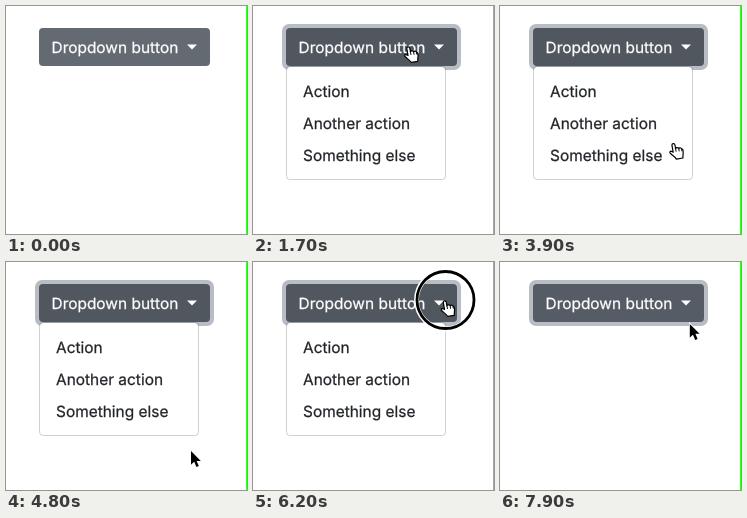
These frames come from a looping animation (241 by 228 pixels, 8 s). An HTML page:

```html
<!DOCTYPE html>
<html lang="en">
<head>
<meta charset="utf-8">
<title>Dropdown</title>
<style>
  html, body { margin: 0; width: 100%; height: 100%; overflow: hidden; background: #fff; }
  svg { display: block; width: 241px; height: 228px; }
  text {
    font: 15.45px Inter, Roboto, sans-serif; text-rendering: geometricPrecision;
    fill: #212529; stroke: #212529; stroke-width: .25;
  }
  .label { fill: #fff; stroke: #fff; }
</style>
</head>
<body>
<svg viewBox="0 0 241 228">
  <rect id="focus" x="29" y="18" width="179" height="46" rx="7" fill="#b8bcc5"/>
  <rect id="button" x="33" y="22" width="171" height="38" rx="4"/>
  <text class="label" x="45.5" y="46.5">Dropdown button</text>
  <path d="M181 38.5h10l-5 5z" fill="#fff"/>
  <g id="menu">
    <rect x="34" y="61" width="158" height="112" rx="3" fill="#fff"/>
    <rect x="33.5" y="60.5" width="159" height="113" rx="3.5" fill="none" stroke="#000" stroke-opacity=".18"/>
    <text x="50" y="91">Action</text>
    <text x="50" y="123">Another action</text>
    <text x="50" y="155">Something else</text>
  </g>
  <g id="pointer">
    <g id="ring" fill="none">
      <circle r="29" stroke="#fff" stroke-width="4.8"/>
      <circle r="28.5" stroke="#000" stroke-width="2.8"/>
    </g>
    <path id="arrow" d="M.8 1V14.6L4 11.7 6.2 17 8.6 16 6.4 10.8H10.6Z" stroke="#fff" paint-order="stroke" stroke-width="1.6"/>
    <g id="hand" transform="rotate(-10 2 9)" fill="#fff" stroke="#000" stroke-width="1.2" stroke-linejoin="round">
      <path d="M-1 9V2Q-1 .6 .5 .6T2 2V5.8Q2.5 4.7 4 5.2T5.2 6.4Q6 5.6 7 6.1T8 7.4Q9 7.2 9 9C9 12 8 13 7.6 16.4H1C0 13.5-3 11.5-4.2 9.4Q-4.6 7.5-2.8 7.6Z"/>
      <path d="M2 6V9M5.1 6.6V9.2M7.8 7.6V9.6" fill="none" stroke-width=".9"/>
    </g>
  </g>
  <rect x="240" width="1" height="228" fill="#33ff1f"/>
</svg>
<script>
const LOOP = 8000, STEP = 100;
const $ = id => document.getElementById(id);
const show = (id, on) => $(id).setAttribute('visibility', on ? 'inherit' : 'hidden');
const within = (t, from, to) => t >= from && t < to;
const ease = u => u * u * (3 - 2 * u);

// Each move eases from the previous resting point, bowing sideways by bend.
const entry = { x: 261, y: 155 };
const moves = [
  { from: 200, to: 970, x: 156, y: 40, bend: -24 },
  { from: 3320, to: 4300, x: 184.5, y: 192, bend: 0 },
  { from: 4700, to: 5750, x: 192.5, y: 38, bend: -6 },
  { from: 7000, to: 7500, x: 213, y: 94, bend: 0 },
  { from: 7600, to: 7900, x: 189, y: 61, bend: 0 }
];

function position(t) {
  let { x, y } = entry;
  for (const m of moves) {
    const e = ease(Math.min(1, Math.max(0, (t - m.from) / (m.to - m.from))));
    x += (m.x - x) * e + m.bend * Math.sin(Math.PI * e);
    y += (m.y - y) * e;
  }
  return [x, y];
}

function draw(now) {
  const t = Math.floor(now % LOOP / STEP) * STEP;
  const [x, y] = position(t);
  const visible = t >= 400;
  const open = within(t, 1600, 6300);
  const focused = t >= 1500;
  const onButton = visible && x > 33 && x < 204 && y > 22 && y < 60;
  const onItem = open && x > 33 && x < 193 && y > 69 && y < 165;
  const hand = onButton || onItem;

  $('button').setAttribute('fill',
    open ? '#50575e' : focused ? '#555c65' : onButton ? '#5d646c' : '#636a72');
  show('focus', focused);
  show('menu', open);
  show('pointer', visible);
  show('hand', hand);
  show('arrow', !hand);
  show('ring', within(t, 1500, 1700) || within(t, 6200, 6400));
  $('pointer').setAttribute('transform', `translate(${x} ${y})`);
}

const start = performance.now();
function tick() {
  draw(performance.now() - start);
  requestAnimationFrame(tick);
}
tick();
</script>
</body>
</html>
```
